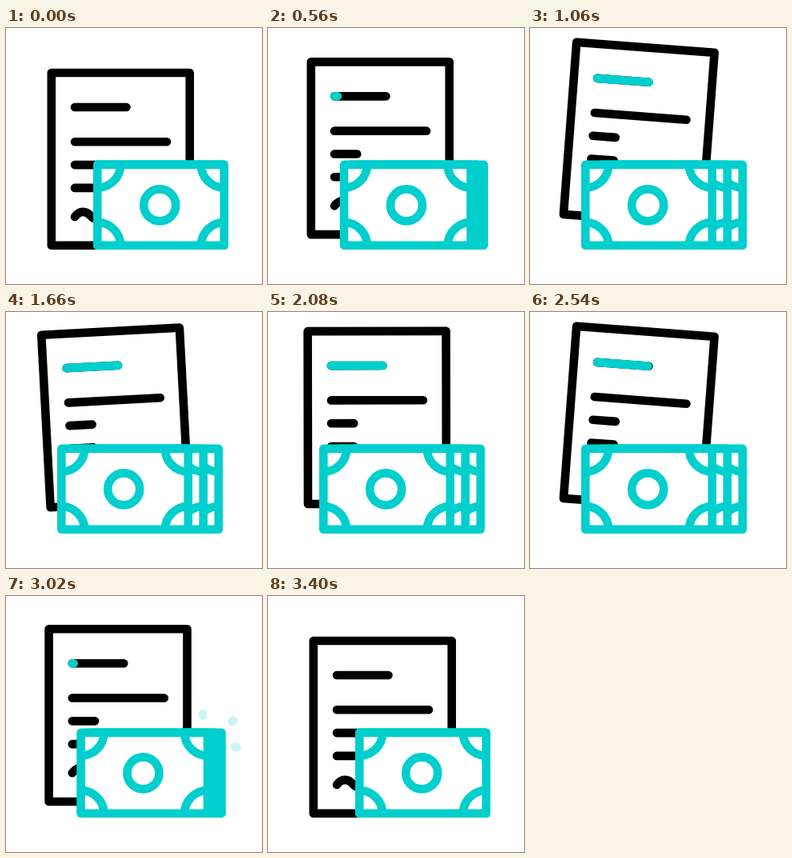
Animation, 320 px wide and 320 px high, one loop 3.62 s. Source, as an HTML page:

```html
<!DOCTYPE html>
<html lang="en">
<head>
<meta charset="utf-8">
<title>Bill payment</title>
<style>
  html, body { margin: 0; width: 100%; height: 100%; overflow: hidden; background: #fff; }
  svg { display: block; width: 100vw; height: 100vh; }
  g { fill: none; stroke: #000; stroke-width: 10.6; stroke-linecap: round; stroke-linejoin: round; }
  .cyan { stroke: #00cfcd; }
</style>
</head>
<body>
<svg viewBox="0 0 320 320">
  <defs>
    <g id="note" class="cyan">
      <path fill="#fff" d="M114.3 170.9H272.7V271.8H114.3Z"/>
      <path stroke-linecap="butt" d="M143.1 170.9a28.8 28.8 0 0 1-28.8 28.8M243.9 170.9a28.8 28.8 0 0 0 28.8 28.8M143.1 271.8a28.8 28.8 0 0 0-28.8-28.8M243.9 271.8a28.8 28.8 0 0 1 28.8-28.8"/>
      <circle cx="192.2" cy="221.4" r="20"/>
    </g>
  </defs>
  <g id="doc">
    <path d="M56.8 56H229.7V271.8H56.8Z"/>
    <path d="M86 99H150.5M86 142.3H201M86 171.1H114.3M86 199.9H114.3M86 236c6-8 14-8 20-1c4 5 10 5 15 0"/>
    <path id="ink" class="cyan"/>
  </g>
  <use class="note" href="#note"/>
  <use class="note" href="#note"/>
  <use class="note" href="#note"/>
  <g id="sparks" class="cyan"><path/><path/><path/></g>
</svg>
<script>
const LOOP = 3620;
const $ = id => document.getElementById(id);
const notes = document.querySelectorAll('.note');
const sparks = $('sparks').children;

// Start point and outward direction of each spark
const rays = [[246, 148.5, -.2, -.98], [283, 156.5, .74, -.67], [287, 188.8, .99, .14]];
const noteShift = [-7, -26, -45];

const clamp = x => Math.min(1, Math.max(0, x));
const linear = (t, a, b) => clamp((t - a) / (b - a));
const ease = (t, a, b) => {
  const p = linear(t, a, b);
  return p * p * (3 - 2 * p);
};

function draw(t) {
  const out = ease(t, 200, 1000) - ease(t, 2600, 3400);
  const tilt = 5 * ease(t, 600, 1200) - 9.3 * ease(t, 1200, 1800)
    + 9.3 * ease(t, 1800, 2400) - 5 * ease(t, 2400, 3000);
  $('doc').setAttribute('transform',
    `translate(${-7 * out} ${-32 * out}) rotate(${tilt} 143.3 164)`);
  notes.forEach((note, i) => note.setAttribute('transform', `translate(${noteShift[i] * out} 0)`));

  const ink = ease(t, 480, 1020) - ease(t, 2500, 3080);
  $('ink').setAttribute('d', ink > 0 ? `M86 99h${64.5 * ink}` : '');

  $('sparks').setAttribute('opacity', linear(t, 3000, 3100) - linear(t, 3280, 3390));
  const head = 1 + 15 * ease(t, 3000, 3220);
  const tail = -1 + 15 * ease(t, 3160, 3400);
  rays.forEach(([x, y, dx, dy], i) => sparks[i].setAttribute('d',
    `M${x + dx * tail} ${y + dy * tail}L${x + dx * head} ${y + dy * head}`));
}

const start = performance.now();
function tick() {
  draw((performance.now() - start) % LOOP);
  requestAnimationFrame(tick);
}
tick();
</script>
</body>
</html>
```
